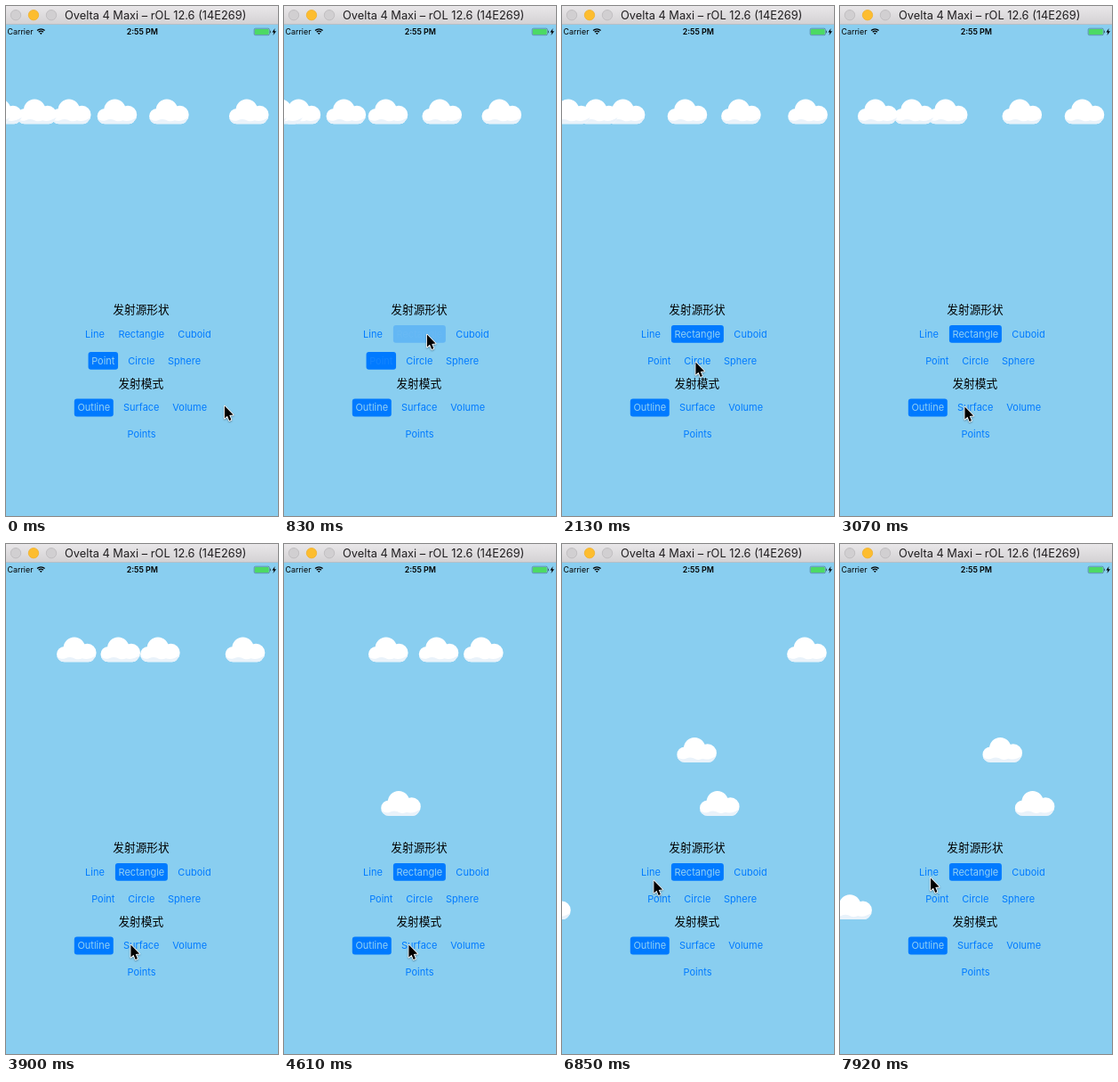
These frames come from a looping animation (306 px wide and 572 px high, 8000 ms). An HTML page with a canvas:

```html
<!DOCTYPE html>
<html lang="zh-CN">
<head>
<meta charset="utf-8">
<title>Cloud emitter</title>
<style>
  html, body { margin: 0; width: 100%; height: 100%; overflow: hidden; background: #89cef0; }
  canvas { display: block; width: 306px; height: 572px; }
</style>
</head>
<body>
<canvas id="stage"></canvas>
<script>
const W = 306, H = 572, LOOP = 8000, STEP = 118.3;
const SKY = '#89cef0', BLUE = '#007aff';
const SANS = 'Inter, Roboto, sans-serif';
const CJK = '"Noto Sans CJK SC", "Noto Sans CJK", sans-serif';

const canvas = document.getElementById('stage');
const ctx = canvas.getContext('2d');
const dpr = window.devicePixelRatio || 1;
canvas.width = W * dpr;
canvas.height = H * dpr;

// Clouds start at rest and accelerate to the right.
const ACCEL = 11.4;
const pointBirths = [-7.27, -6.09, -5.18, -4.215, -3.315, -2.04, -1.34, -0.435];
const clouds = pointBirths.map(born => ({ born, x: -50.5, y: 104.2 }));
clouds.push(
  { born: 3.95, x: 106.5, y: 276.8 },
  { born: 4.83, x: 105.6, y: 216.8 },
  { born: 5.24, x: -50, y: 393 }
);

// Pointer path: time in seconds, x, y
const path = [
  [0, 245, 448], [0.1, 245, 448], [0.7, 160, 368], [1.7, 160, 368],
  [2.13, 149.5, 399], [2.6, 139.5, 449], [5.9, 139.5, 449], [6.9, 101, 374]
];

// Label, centre x, centre y, width of the highlight
const buttons = [
  ['Line', 100, 368], ['Rectangle', 152.4, 368, 59], ['Cuboid', 212, 368],
  ['Point', 109.3, 398, 33.5], ['Circle', 152.3, 398], ['Sphere', 200.5, 398],
  ['Outline', 98.8, 450.6, 44], ['Surface', 152.2, 450.6], ['Volume', 206.7, 450.6],
  ['Points', 152.5, 480.6]
];

function text(str, x, y, size, { color = '#000', weight = 400, align = 'center', font = SANS } = {}) {
  ctx.font = `${weight} ${size}px ${font}`;
  ctx.textAlign = align;
  ctx.textBaseline = 'alphabetic';
  ctx.fillStyle = color;
  ctx.fillText(str, x, y);
}

function box(x, y, w, h, r, color) {
  ctx.beginPath();
  ctx.roundRect(x, y, w, h, r);
  ctx.fillStyle = color;
  ctx.fill();
}

function polygon(points) {
  ctx.beginPath();
  points.forEach(([x, y]) => ctx.lineTo(x, y));
  ctx.closePath();
}

function dot(x, y, r, fill, stroke) {
  ctx.beginPath();
  ctx.arc(x, y, r, 0, 7);
  ctx.fillStyle = fill;
  ctx.fill();
  ctx.strokeStyle = stroke;
  ctx.lineWidth = 0.8;
  ctx.stroke();
}

function drawTitleBar() {
  const g = ctx.createLinearGradient(0, 0, 0, 21);
  g.addColorStop(0, '#e9e7e9');
  g.addColorStop(1, '#d3d1d3');
  ctx.fillStyle = g;
  ctx.fillRect(0, 0, W, 20.5);
  ctx.fillStyle = '#b9bdc2';
  ctx.fillRect(0, 20, W, 0.8);
  dot(11, 10.2, 5.7, '#d1cfd1', '#bbb9bb');
  dot(31, 10.2, 5.7, '#fdbd2f', '#efb02c');
  dot(51, 10.2, 5.7, '#d1cfd1', '#bbb9bb');
  text('Ovelta 4 Maxi – rOL 12.6 (14E269)', 66, 15, 12.8, { color: '#1f1d1f', align: 'left' });
}

function drawStatusBar() {
  text('Carrier', 1.5, 32, 8.87, { align: 'left' });
  text('2:55 PM', 153.3, 32, 8.87, { weight: 600 });

  ctx.strokeStyle = '#000';
  ctx.lineWidth = 1.3;
  for (const r of [3.6, 6]) {
    ctx.beginPath();
    ctx.arc(39.3, 31.8, r, -Math.PI * 0.75, -Math.PI * 0.25);
    ctx.stroke();
  }
  ctx.beginPath();
  ctx.moveTo(39.3, 32);
  ctx.arc(39.3, 32, 2, -Math.PI * 0.75, -Math.PI * 0.25);
  ctx.fillStyle = '#000';
  ctx.fill();

  ctx.beginPath();
  ctx.roundRect(279.2, 25.2, 17.2, 7.5, 1.5);
  ctx.strokeStyle = '#3d6a72';
  ctx.lineWidth = 0.6;
  ctx.stroke();
  box(279.9, 25.9, 15.8, 6.1, 1, '#4cd964');
  box(297, 27.5, 1, 2.8, 0.5, '#3d6a72');
  polygon([[302.6, 25], [299.4, 29.6], [301.4, 29.6], [300.4, 33], [304, 28.2], [301.9, 28.2]]);
  ctx.fillStyle = '#000';
  ctx.fill();
}

function drawCloud(x, y) {
  ctx.save();
  ctx.translate(x, y);
  const shape = new Path2D();
  shape.arc(8.8, 19.4, 8.6, 0, 7);
  shape.closePath();
  for (const [cx, cy, r] of [[20, 12.4, 12.2], [34.6, 17.7, 10.2]]) {
    shape.moveTo(cx + r, cy);
    shape.arc(cx, cy, r, 0, 7);
  }
  shape.roundRect(2, 16, 41, 12, [0, 0, 7, 7]);
  ctx.fillStyle = '#fff';
  ctx.fill(shape);

  ctx.clip(shape);
  ctx.beginPath();
  ctx.moveTo(0, 21);
  ctx.quadraticCurveTo(4, 26, 10, 24);
  ctx.quadraticCurveTo(16, 21.3, 21, 24.5);
  ctx.quadraticCurveTo(25, 26, 29, 24);
  ctx.quadraticCurveTo(36, 26.5, 45, 20.5);
  ctx.lineTo(45, 29);
  ctx.lineTo(0, 29);
  ctx.fillStyle = '#e9f2fa';
  ctx.fill();
  ctx.restore();
}

// How far the tapped button has become selected, 0 to 1
function selection(t) {
  if (t < 0.8) return 0;
  if (t < 0.9) return 0.28;
  if (t < 1) return 0.7;
  return 1;
}

function drawButton([label, x, y, w], picked) {
  const selected = { Rectangle: picked, Point: 1 - picked, Outline: 1 }[label] || 0;
  const fading = selected > 0 && selected < 1;
  if (selected) {
    ctx.globalAlpha = label === 'Point' && selected > 0.5 ? 1 : selected;
    box(x - w / 2, y - 10, w, 19.8, 3, BLUE);
    ctx.globalAlpha = 1;
  }
  if (fading) ctx.globalAlpha = 0.12;
  text(label, x, y + 3.6, 11, { color: selected ? '#93d0f3' : BLUE });
  ctx.globalAlpha = 1;
}

function pointerAt(t) {
  const i = path.findIndex(p => p[0] > t);
  if (i < 0) return path[path.length - 1].slice(1);
  const [t0, x0, y0] = path[i - 1], [t1, x1, y1] = path[i];
  const k = (t - t0) / (t1 - t0);
  return [x0 + (x1 - x0) * k, y0 + (y1 - y0) * k];
}

function drawPointer([x, y]) {
  ctx.save();
  ctx.translate(x, y);
  polygon([[0.9, 0.6], [0.9, 14.6], [4, 11.8], [6.2, 17], [8.4, 16.1], [6.3, 11], [10.6, 10.6]]);
  ctx.shadowColor = 'rgba(0,0,0,.35)';
  ctx.shadowBlur = 2 * dpr;
  ctx.shadowOffsetY = dpr;
  ctx.lineJoin = 'round';
  ctx.strokeStyle = '#fff';
  ctx.lineWidth = 1.7;
  ctx.stroke();
  ctx.shadowColor = 'transparent';
  ctx.fillStyle = '#000';
  ctx.fill();
  ctx.restore();
}

function draw(t) {
  ctx.setTransform(dpr, 0, 0, dpr, 0, 0);
  ctx.fillStyle = SKY;
  ctx.fillRect(0, 0, W, H);

  for (const { born, x, y } of clouds) {
    const age = t - born;
    if (age > 0.25) drawCloud(x + ACCEL * age * age / 2, y);
  }

  drawTitleBar();
  drawStatusBar();
  text('发射源形状', 152, 345, 12.7, { font: CJK });
  text('发射模式', 151.8, 428, 12.7, { font: CJK });
  const picked = selection(t);
  buttons.forEach(b => drawButton(b, picked));
  drawPointer(pointerAt(t));
}

const start = performance.now();
function tick() {
  const ms = (performance.now() - start) % LOOP;
  draw(Math.floor((ms + 16) / STEP) * STEP / 1000);
  requestAnimationFrame(tick);
}
tick();
</script>
</body>
</html>
```
